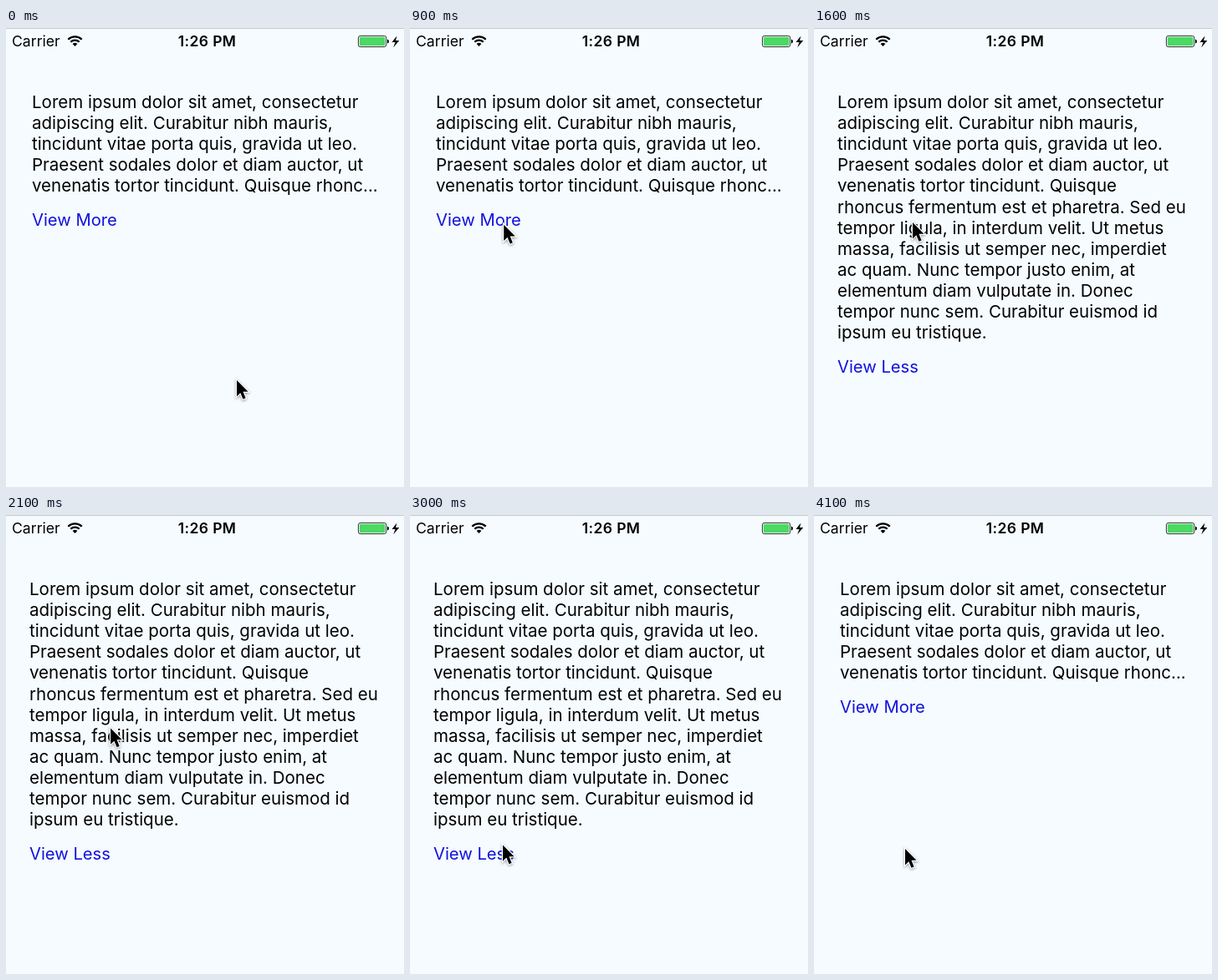
Animation, 476 px wide and 550 px high, one loop 4.2 s. Source, as an HTML page:

```html
<!DOCTYPE html>
<html lang="en">
<head>
<meta charset="utf-8">
<title>View more</title>
<style>
html, body { margin: 0; width: 100%; height: 100%; overflow: hidden; background: #f5fbff; }
svg { display: block; width: 476px; height: 550px; font-family: Inter, sans-serif; }
.copy { font-size: 20.51px; }
.link { font-size: 20.2px; fill: #1212dc; }
.status { font-size: 17.6px; }
.time { font-size: 17.5px; font-weight: 600; letter-spacing: .4px; }
</style>
</head>
<body>
<svg viewBox="0 0 476 550">
  <rect width="476" height="550" fill="#f5fbff"/>
  <rect width="476" height="1" fill="#c6cacd"/>
  <text class="status" x="7" y="22">Carrier</text>
  <g transform="translate(82.5 22)" fill="none" stroke="#000" stroke-width="2.3">
    <path d="M-8.2-8.2a11.6 11.6 0 0 1 16.4 0M-5.2-5.2a7.4 7.4 0 0 1 10.4 0"/>
    <path d="M0 0L-2.9-2.9a4.1 4.1 0 0 1 5.8 0z" fill="#000" stroke="none"/>
  </g>
  <text class="time" x="240.5" y="22" text-anchor="middle">1:26 PM</text>
  <rect x="421.4" y="9.4" width="33.4" height="13.2" rx="2.5" fill="#f5fbff" stroke="#333"/>
  <rect x="422.8" y="10.8" width="30.6" height="10.4" rx="1.2" fill="#4cd964"/>
  <path d="M456 13.5q2 .5 2 2.5t-2 2.5z"/>
  <path d="M467.5 9.5l-6 7.6h4l-2.2 6.2 7-8.2h-4.2z"/>
  <g id="more" class="copy"></g>
  <g id="less" class="copy"></g>
  <path id="cursor" d="M0 0V19.4L4.3 15.2 7.5 22.8 10.6 21.5 7.5 13.8H13.6Z"
    stroke="#fff" stroke-width="2.4" paint-order="stroke" style="filter:drop-shadow(0 1.5px 1.5px #0006)"/>
</svg>
<script>
const LOOP = 4200, STEP = 100, OPEN = 1600, CLOSE = 3700;
const intro = [
  "Lorem ipsum dolor sit amet, consectetur",
  "adipiscing elit. Curabitur nibh mauris,",
  "tincidunt vitae porta quis, gravida ut leo.",
  "Praesent sodales dolor et diam auctor, ut"
];
const short = [...intro, "venenatis tortor tincidunt. Quisque rhonc..."];
const full = [
  ...intro,
  "venenatis tortor tincidunt. Quisque",
  "rhoncus fermentum est et pharetra. Sed eu",
  "tempor ligula, in interdum velit. Ut metus",
  "massa, facilisis ut semper nec, imperdiet",
  "ac quam. Nunc tempor justo enim, at",
  "elementum diam vulputate in. Donec",
  "tempor nunc sem. Curabitur euismod id",
  "ipsum eu tristique."
];
// Pointer stops, joined by a smooth curve that never overshoots
const stops = [
  { t: 0, x: 276, y: 422 },
  { t: 500, x: 162, y: 280 },
  { t: 1000, x: 109, y: 233 },
  { t: 1400, x: 118, y: 233 },
  { t: 1800, x: 118, y: 233 },
  { t: 2500, x: 136, y: 314 },
  { t: 3100, x: 109, y: 400 },
  { t: LOOP, x: 109, y: 400 }
];
const $ = id => document.getElementById(id);

function addText(group, str, x, y, cls) {
  const el = document.createElementNS("http://www.w3.org/2000/svg", "text");
  el.setAttribute("x", x);
  el.setAttribute("y", y);
  if (cls) el.setAttribute("class", cls);
  el.textContent = str;
  group.append(el);
}

function addBlock(group, lines, x, label) {
  lines.forEach((line, i) => addText(group, line, x, 96 + i * 25.1));
  addText(group, label, x, 112 + lines.length * 25.05, "link");
}

function slope(i, axis) {
  const a = stops[i], b = stops[i + 1];
  return a && b ? (b[axis] - a[axis]) / (b.t - a.t) : 0;
}

// Harmonic mean of both sides; zero where the direction turns
function tangent(i, axis) {
  const a = slope(i - 1, axis), b = slope(i, axis);
  return a * b > 0 ? 2 * a * b / (a + b) : 0;
}

function glide(t, axis) {
  const i = stops.findIndex(s => s.t > t) - 1;
  const a = stops[i], b = stops[i + 1];
  const span = b.t - a.t, k = (t - a.t) / span, j = 1 - k;
  return a[axis] * j * j * (1 + 2 * k) + b[axis] * k * k * (1 + 2 * j)
    + span * k * j * (tangent(i, axis) * j - tangent(i + 1, axis) * k);
}

function draw(now) {
  const t = Math.floor((now % LOOP) / STEP) * STEP;
  const open = t >= OPEN && t < CLOSE;
  $("more").style.display = open ? "none" : "";
  $("less").style.display = open ? "" : "none";
  $("cursor").setAttribute("transform", `translate(${glide(t, "x")} ${glide(t, "y")})`);
}

addBlock($("more"), short, 31, "View More");
addBlock($("less"), full, 28, "View Less");
const start = performance.now();
(function tick() {
  draw(performance.now() - start);
  requestAnimationFrame(tick);
})();
</script>
</body>
</html>
```
